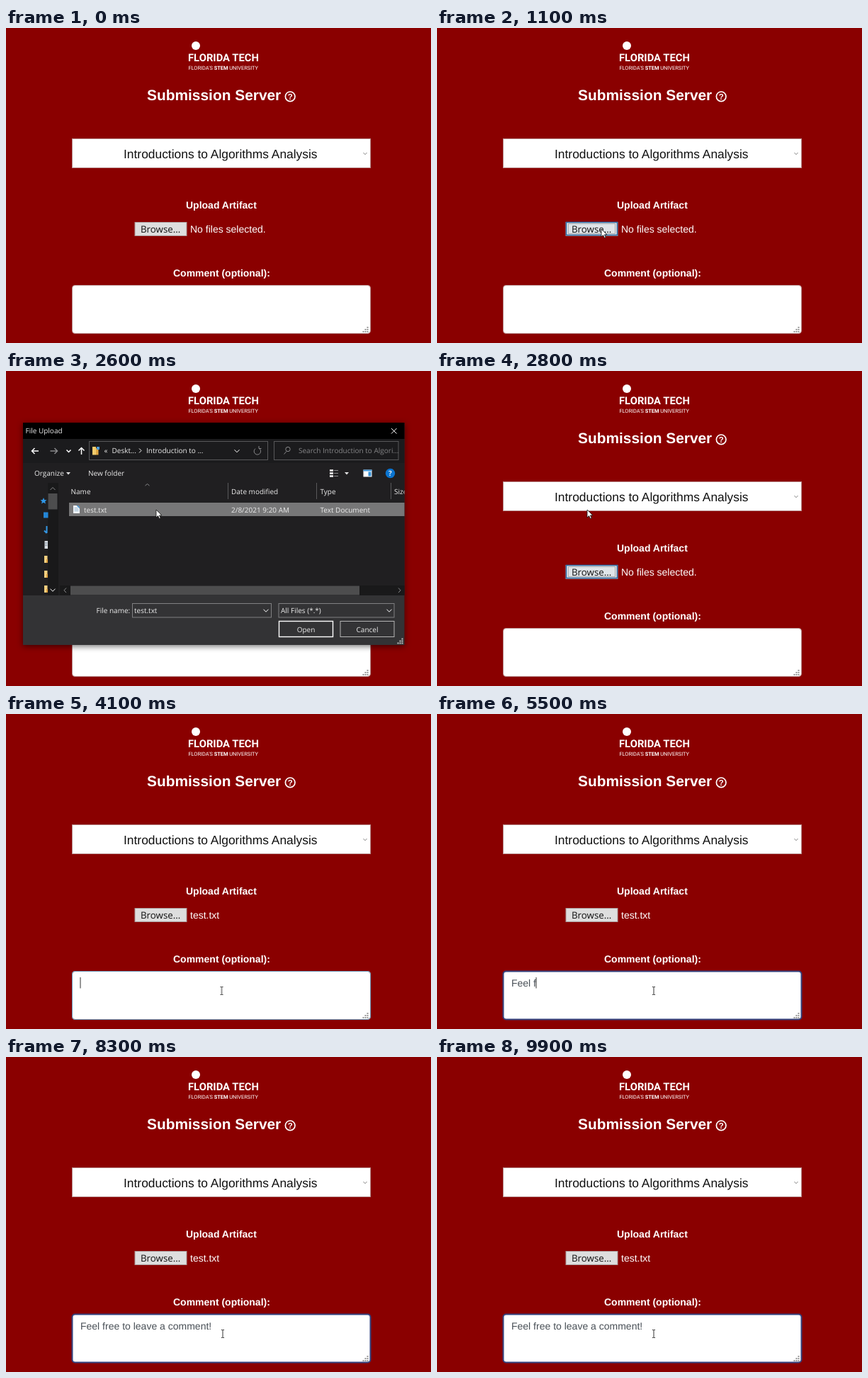
These frames come from a looping animation (600x445 px, 10000 ms). An HTML page:

```html
<!DOCTYPE html>
<html lang="en">
<head>
<meta charset="utf-8">
<title>Submission Server</title>
<style>
html, body { margin: 0; width: 100%; height: 100%; overflow: hidden; background: #8a0000; }
svg { display: block; width: 600px; height: 445px; }
text { white-space: pre; text-rendering: geometricPrecision; }
.page { font: 14px "Liberation Sans", Arial, sans-serif; fill: #fff; }
.bold { font-weight: bold; }
.logo { font-family: Roboto, sans-serif; }
.ui { font: 10px "Open Sans", "Noto Sans", sans-serif; fill: #ececec; }
.line { fill: none; stroke: #fff; stroke-width: 1.5; }
.dim { stroke: #8a8a8c; }
.thin { stroke-width: 1; }
.frame { stroke: #b98f8f; }

.browse-focus, .dialog, .title-icon, .title-text, .hover, .picked, .none, .chosen,
.ring, .arrow, .arrow-show, .beam, .caret {
  animation: 10s linear infinite;
}
.browse-focus, .title-icon, .title-text, .hover, .picked, .none, .chosen, .arrow-show, .beam, .caret {
  animation-timing-function: step-end;
}
.arrow { animation-name: move; animation-timing-function: ease-in-out; }
.arrow-show { animation-name: arrow-show; }
.beam { animation-name: beam; }
.caret { animation-name: blink; }
.dialog { animation-name: dialog; filter: drop-shadow(0 2px 4px rgba(0, 0, 0, .55)); }
.title-icon { animation-name: title-icon; }
.title-text { animation-name: title-text; }
.hover { animation-name: hover; }
.picked { animation-name: picked; }
.browse-focus { animation-name: browse-focus; }
.none { animation-name: none-text; }
.chosen { animation-name: chosen; }
.ring { animation-name: ring; }

@keyframes move {
  0%, 1% { transform: translate(330px, 330px); }
  8%, 11.5% { transform: translate(232px, 284px); }
  14%, 18.5% { transform: translate(230px, 251px); }
  22.5%, 29.5% { transform: translate(212px, 196px); }
  40%, 100% { transform: translate(304px, 390px); }
}
@keyframes arrow-show { 0% { opacity: 0; } 1% { opacity: 1; } 38.2%, 100% { opacity: 0; } }
@keyframes beam {
  0% { opacity: 0; transform: translate(303px, 388px); }
  38.2% { opacity: 1; transform: translate(303px, 388px); }
  40% { opacity: 1; transform: translate(304.5px, 391px); }
  43%, 100% { opacity: 1; transform: translate(306px, 391px); }
}
@keyframes blink {
  0%, 46%, 83%, 93%, 99%, 100% { opacity: 0; }
  41%, 48%, 88%, 98% { opacity: 1; }
}
@keyframes dialog { 0%, 11.6% { opacity: 0; } 12.8%, 26.6% { opacity: 1; } 27.6%, 100% { opacity: 0; } }
@keyframes title-icon { 0% { opacity: 1; } 25%, 100% { opacity: 0; } }
@keyframes title-text { 0% { transform: none; } 25%, 100% { transform: translateX(-17px); } }
@keyframes hover { 0% { opacity: 0; } 21.5% { opacity: 1; } 24%, 100% { opacity: 0; } }
@keyframes picked { 0% { opacity: 0; } 24%, 100% { opacity: 1; } }
@keyframes browse-focus { 0% { opacity: 0; } 11% { opacity: 1; } 41%, 100% { opacity: 0; } }
@keyframes none-text { 0% { opacity: 1; } 29%, 100% { opacity: 0; } }
@keyframes chosen { 0% { opacity: 0; } 29%, 100% { opacity: 1; } }
@keyframes ring {
  0%, 40.5% { stroke: #6f9fc0; stroke-width: 1px; opacity: 0; }
  41% { stroke: #6f9fc0; stroke-width: 1px; opacity: 1; }
  44%, 100% { stroke: #34437f; stroke-width: 2px; opacity: 1; }
}
</style>
</head>
<body>
<svg viewBox="0 0 600 445">
  <defs>
    <path id="down" class="line thin" d="M-3.5-1.8 0 1.8 3.5-1.8"/>
    <path id="tri" d="M-3-1.5H3L0 2Z" fill="#e0e0e0"/>
    <path id="grip" d="M6 0h2v2h-2zM3 3h2v2h-2zM6 3h2v2h-2zM0 6h2v2h-2zM3 6h2v2h-2zM6 6h2v2h-2z"/>
    <g id="folder">
      <path d="M-2.5-5H2V5H-2.5Z" fill="#f5d080"/>
      <path d="M.5 0H2.5V5H.5Z" fill="#d99b3c"/>
    </g>
    <g id="doc">
      <path d="M-4.500-5.500H2L4.500-3V5.500H-4.500Z" fill="#eef3f7"/>
      <path d="M0-5.500H2L4.500-3V-1Z" fill="#3b8ed0"/>
      <path d="M-3-2H2M-3 0H3M-3 2H3" stroke="#8fb2cc" stroke-width=".8"/>
    </g>
  </defs>

  <rect width="600" height="445" fill="#8a0000"/>

  <g class="page">
    <circle cx="268" cy="25" r="6"/>
    <text class="logo bold" x="257" y="47" font-size="14.8">FLORIDA TECH</text>
    <text class="logo" x="257.5" y="59" font-size="7.4">FLORIDA'S <tspan class="bold">STEM</tspan> UNIVERSITY</text>

    <text class="bold" x="199" y="102" font-size="20.9">Submission Server</text>
    <circle class="line" cx="401.2" cy="96.8" r="6.8" style="stroke-width:1.7"/>
    <text class="bold" x="401.2" y="101" font-size="11.5" text-anchor="middle">?</text>

    <rect class="frame" x="93.5" y="156.5" width="421" height="41"/>
    <text x="166" y="183.5" font-size="17.4" fill="#111">Introductions to Algorithms Analysis</text>
    <path d="M504.5 176 507 178.8 509.5 176" fill="none" stroke="#888"/>

    <text class="bold" x="254" y="255">Upload Artifact</text>
    <rect x="182" y="274.5" width="73" height="19" fill="#dedede" stroke="#a99"/>
    <g class="browse-focus">
      <rect x="182.5" y="274.5" width="72" height="18" fill="#dfe4e8" stroke="#2f6ea8" stroke-width="1.6"/>
      <rect x="185.5" y="276.5" width="66" height="14" fill="none" stroke="#777" stroke-dasharray="1 1"/>
    </g>
    <text x="190" y="289" style="font:13.3px 'Open Sans','Noto Sans',sans-serif" fill="#111">Browse...</text>
    <text class="none" x="260" y="289">No files selected.</text>
    <text class="chosen" x="260" y="289">test.txt</text>

    <text class="bold" x="236" y="351">Comment (optional):</text>
    <rect class="frame" x="93.5" y="363.5" width="421" height="68" rx="4"/>
    <rect class="ring" x="93.5" y="363.5" width="421" height="68" rx="4" fill="none"/>
    <use href="#grip" x="503.5" y="422" fill="#999"/>
    <text id="note" x="105" y="384.5" fill="#495057"></text>
    <rect id="caret" class="caret" x="104.5" y="372" width="1" height="15.5" fill="#333"/>
  </g>

  <g class="dialog ui">
    <rect x="24" y="73" width="538.5" height="314" fill="#333335"/>
    <rect x="24" y="73" width="538.5" height="23" fill="#000"/>
    <rect x="24" y="96" width="538.5" height="34" fill="#1b1b1d"/>
    <rect x="24" y="130" width="538.5" height="187" fill="#201f21"/>

    <circle class="title-icon" cx="34" cy="84.5" r="6.5" fill="#f27a2c"/>
    <text class="title-text" x="44.5" y="88">File Upload</text>
    <path class="line thin" d="M544 81l7.5 7.5M551.5 81l-7.5 7.5"/>

    <path class="line" d="M46 113H36.5M40.5 109l-4 4 4 4"/>
    <path class="line dim" d="M62.5 113H72.5M68.500 109l4 4-4 4"/>
    <path class="line" d="M85.5 111.500l3 3 3-3"/>
    <path class="line" d="M106.5 118V108.5M102.5 112.5l4-4 4 4"/>
    <g class="line thin" style="stroke:#58585a">
      <rect x="117.5" y="99.5" width="252" height="26"/>
      <rect x="378.5" y="99.5" width="175.5" height="26"/>
    </g>
    <path d="M122 107h5v11.500h-5z" fill="#f2cb6c"/>
    <path d="M127 109h3.500v9.500h-3.500z" fill="#dfa743"/>
    <path d="M128 107h4v4h-4z" fill="#4b9bd8"/>
    <text x="138.5" y="116">«</text>
    <text x="149.5" y="116">Deskt...</text>
    <path class="line thin" d="M188 109.5l3 3-3 3"/>
    <text x="198" y="116">Introduction to ...</text>
    <use href="#down" x="326" y="113"/>
    <path class="line dim thin" d="M357 109.200A4.700 4.700 0 1 1 352 109.700M357 106v3.500h3.500"/>
    <path class="line dim thin" d="M392.5 117.5l3.5-4"/>
    <circle class="line dim thin" cx="398" cy="110.5" r="3.2"/>
    <text x="413" y="116" fill="#858587">Search Introduction to Algori...</text>

    <text x="40" y="148">Organize</text>
    <use href="#tri" x="88" y="144.5"/>
    <text x="116" y="148">New folder</text>
    <path class="line" d="M457 140.5h5M457 144.5h5M457 148.5h5" style="stroke-width:2.5"/>
    <path class="line dim thin" d="M463 140.5h6M463 144.5h6M463 148.5h6"/>
    <use href="#tri" x="481" y="144.5"/>
    <rect x="504.5" y="139.5" width="12" height="10" fill="#fff"/>
    <path d="M504.5 139.5h12v2h-12zM511.5 142.5h4v6h-4z" fill="#3a94d8"/>
    <circle cx="542.5" cy="144.5" r="6.7" fill="#0b74cf"/>
    <text class="bold" x="542.5" y="148" text-anchor="middle">?</text>

    <rect x="59" y="158" width="15" height="159" fill="#19191a"/>
    <rect x="59.5" y="173" width="13" height="22.5" fill="#4d4d4e"/>
    <path class="line dim thin" d="M62.5 168l3.5-3.5 3.5 3.500"/>
    <use href="#down" x="66" y="309.5"/>
    <path d="M53 179l1.3 2.900 3.200.3-2.400 2.100.8 3.200-2.900-1.700-2.900 1.700.8-3.200-2.400-2.100 3.200-.3z" fill="#2f97e8"/>
    <rect x="53" y="199.5" width="6.5" height="8" fill="#2486d6"/>
    <path class="line" d="M57.5 219v10M54 225.5l3.5 3.5" style="stroke:#3498e6;stroke-width:2"/>
    <rect x="54.5" y="240" width="4.5" height="11" fill="#d8dde2"/>
    <path d="M55 243h3.5M55 246h3.5" stroke="#78889a"/>
    <use href="#folder" x="56.5" y="266"/>
    <use href="#folder" x="56.5" y="287"/>
    <use href="#folder" x="56.5" y="308"/>

    <path class="line thin" d="M313.5 158v23M438.5 158v23M543.5 158v23" style="stroke:#59595b"/>
    <path class="line dim thin" d="M196.5 162l3-2.5 3 2.5"/>
    <text x="91.5" y="173.5">Name</text>
    <text x="318" y="173.5">Date modified</text>
    <text x="443.5" y="173.5">Type</text>
    <svg x="544" y="158" width="18.5" height="24"><text x="4" y="15.5">Size</text></svg>

    <rect class="hover" x="89" y="186" width="473.5" height="19" fill="#4a4a4c"/>
    <rect class="picked" x="89" y="186" width="473.5" height="19" fill="#777778"/>
    <use href="#doc" x="99.5" y="195.5"/>
    <text x="110" y="199.8">test.txt</text>
    <text x="318" y="199.8">2/8/2021 9:20 AM</text>
    <text x="443.5" y="199.8">Text Document</text>

    <rect x="76" y="303" width="486.5" height="14" fill="#19191a"/>
    <rect x="91" y="303.5" width="408" height="13" fill="#4d4d4e"/>
    <path class="line dim thin" d="M85 306.5l-3 3.3 3 3.3"/>
    <path class="line dim thin" d="M554 306.5l3 3.3-3 3.3"/>

    <text x="127.5" y="342">File name:</text>
    <g class="line thin" style="stroke:#808082">
      <rect x="178.5" y="328.5" width="196" height="19.5"/>
      <rect x="385" y="328.5" width="163" height="19.5"/>
      <rect x="472" y="353.5" width="76" height="22" style="stroke:#b5b5b5"/>
      <rect x="385.5" y="353.5" width="76" height="22" style="stroke:#fff;stroke-width:1.4"/>
    </g>
    <text class="picked" x="181" y="342">test.txt</text>
    <use href="#down" x="367" y="338.5"/>
    <text x="388" y="342">All Files (*.*)</text>
    <use href="#down" x="541" y="338.5"/>
    <text x="423.5" y="368.5" text-anchor="middle">Open</text>
    <text x="510" y="368.5" text-anchor="middle">Cancel</text>
    <use href="#grip" x="552.5" y="377.5" fill="#c4c4c4"/>
  </g>

  <g class="arrow-show">
    <path id="arrow" class="arrow" d="M0 0V11L2.6 8.6 4.4 12.6 6.2 11.8 4.5 7.9H8Z" fill="#fff" stroke="#111" stroke-width=".8"/>
  </g>
  <path class="beam" d="M-2-5.5H-.6L0-5 .6-5.5H2M0-5V5M-2 5.5H-.6L0 5 .6 5.5H2" fill="none" stroke="#333"/>
</svg>
<script>
const message = "Feel free to leave a comment!";
const note = document.getElementById("note");
const caret = document.getElementById("caret");
const clock = document.getElementById("arrow").getAnimations()[0];
// Typing pace: time in ms, characters on screen
const pace = [[4750, 1], [5750, 8], [6950, 22], [7750, 29]];

function typed(t) {
  if (t < pace[0][0]) return 0;
  for (let i = 1; i < pace.length; i++) {
    const [t0, n0] = pace[i - 1], [t1, n1] = pace[i];
    if (t < t1) return Math.floor(n0 + (n1 - n0) * (t - t0) / (t1 - t0));
  }
  return message.length;
}

let shown = 0;
function draw() {
  const n = typed((clock.currentTime || 0) % 10000);
  if (n !== shown) {
    note.textContent = message.slice(0, n);
    caret.setAttribute("x", 104.5 + note.getComputedTextLength());
    shown = n;
  }
  requestAnimationFrame(draw);
}
draw();
</script>
</body>
</html>
```
